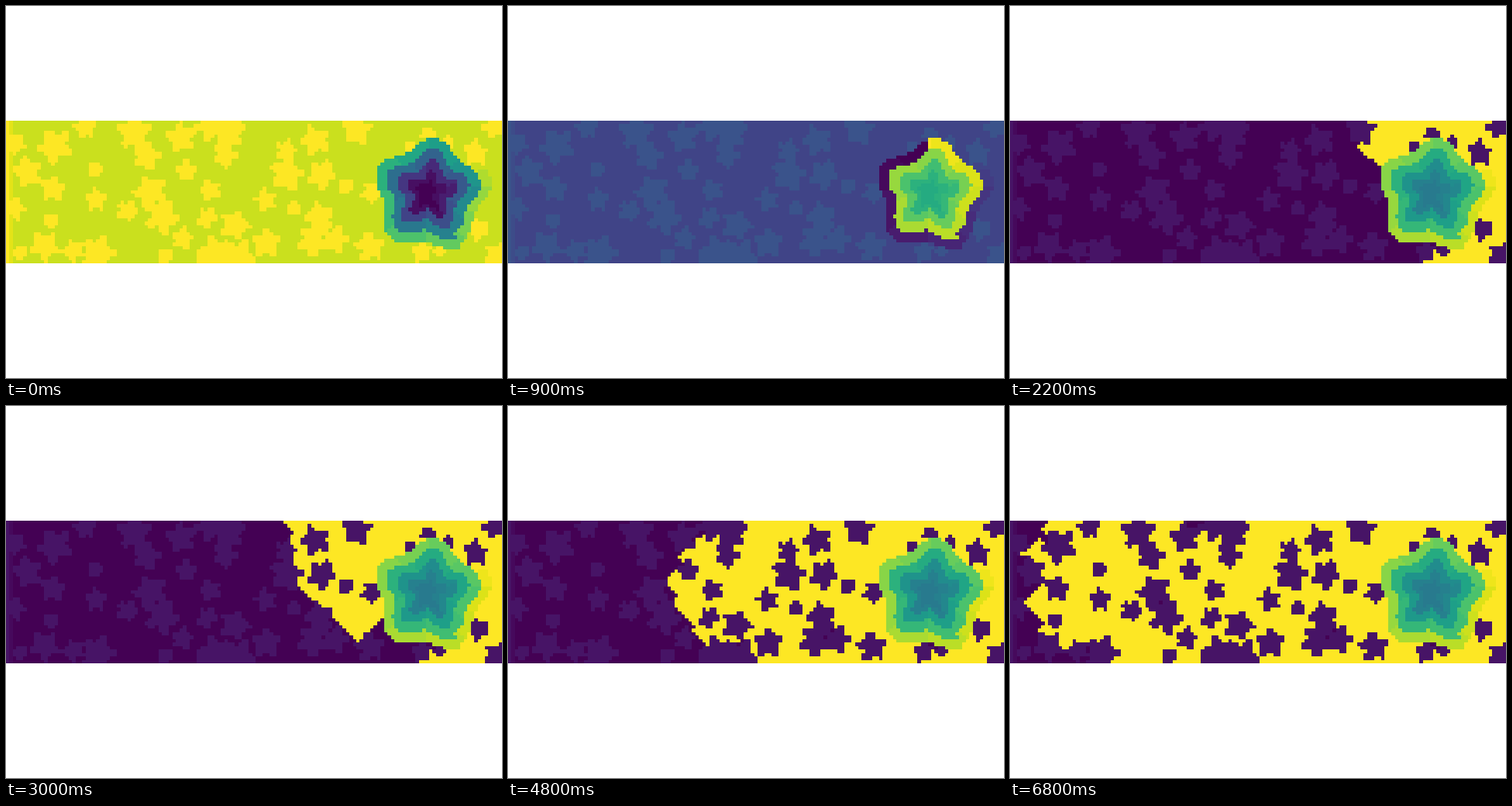
A matplotlib script for the animation above (6900 ms loop, 640 px wide and 480 px high).

```python
from collections import deque

import matplotlib.pyplot as plt
import numpy as np
from matplotlib.animation import FuncAnimation

COLS, ROWS = 143, 41
CELL = 640 / COLS
TOP = 240 - ROWS * CELL / 2
FRAMES = 69
PLAIN, HILL, LIFT = 23, 25, 39

X, Y = np.meshgrid((np.arange(COLS) + 0.5) * CELL,
                   TOP + (np.arange(ROWS) + 0.5) * CELL)

# Rough little hills, grouped by radius in pixels
HILLS = {
    8: [(522, 182), (571, 176), (560, 314)],
    9.5: [(116, 211), (58, 277), (18, 318), (206, 323), (372, 262),
          (438, 233), (544, 165), (255, 330)],
    12.5: [(102, 157), (12, 178), (10, 262), (116, 250), (88, 315),
           (157, 264), (233, 213), (264, 237), (260, 273), (228, 300),
           (335, 250), (473, 241), (362, 187), (537, 316), (610, 288)],
    14: [(282, 192), (606, 190), (630, 156), (632, 322), (60, 236)],
    16.5: [(28, 214), (50, 310), (181, 194), (226, 170), (262, 155),
           (296, 282), (336, 305), (399, 174), (407, 218), (453, 160),
           (405, 273), (396, 304), (425, 301), (470, 310)],
    19: [(63, 181), (120, 318), (165, 163), (186, 240), (202, 272),
         (288, 160), (270, 318), (298, 322), (362, 217)],
}


def polar(cx, cy):
    return np.hypot(X - cx, Y - cy), np.arctan2(cy - Y, X - cx)


def add_hills(land):
    turn = 0.4
    for size, spots in HILLS.items():
        wave = 0.24 if size > 12 else 0.06
        for cx, cy in spots:
            r, a = polar(cx, cy)
            land[r < size * (1 + wave * np.cos(5 * a - turn))] = HILL
            turn += 1.9


def spiral_star():
    """Levels of the star, which climb along an outward spiral."""
    r, a = polar(547, 240)
    phi = (a + np.pi / 3) / (2 * np.pi) % 1
    notch = (1 - np.cos(5 * (a - np.radians(12)))) / 2
    level = np.full(X.shape, np.inf)
    # edge at the tips, notch depth, first level, rise per turn, end of turn
    bands = [(76, 0.18, 19.3, 12, 0.23),
             (62, 0.19, 11, 8.3, 1),
             (48, 0.25, 6, 5, 1),
             (34, 0.34, 1.5, 4.5, 1),
             (20, 0.45, 0.6, 0.9, 1),
             (6, 0.3, 0, 0.4, 1)]
    for edge, depth, start, rise, end in bands:
        inside = (r < (edge + 20 * phi) * (1 - depth * notch)) & (phi <= end)
        level[inside] = (start + rise * phi)[inside]
    return level


def flood(land, star):
    """Cells in the order they are reached: up the star, then over the plain."""
    cells = np.argwhere(np.isfinite(star))
    order = sorted(map(tuple, cells), key=lambda c: star[c])
    seen = set(order)
    queue = deque([(20, 140)])
    seen.add(queue[0])
    while queue:
        row, col = queue.popleft()
        order.append((row, col))
        for step in ((row, col - 1), (row, col + 1),
                     (row - 1, col), (row + 1, col)):
            if (0 <= step[0] < ROWS and 0 <= step[1] < COLS
                    and step not in seen and land[step] <= PLAIN):
                seen.add(step)
                queue.append(step)
    return order


land = np.full((ROWS, COLS), float(PLAIN))
land[:, 1] = 24
add_hills(land)
land[:, 0] = HILL
star = spiral_star()
on_star = np.isfinite(star)
land[on_star] = np.round(star[on_star])

order = flood(land, star)
rank = np.full(land.shape, len(land.flat))
for i, cell in enumerate(order):
    rank[cell] = min(rank[cell], i)
# Constant number of cells per step, so the last step gets to column 3
rate = (rank[:, 3].min() + 1) / (FRAMES - 1)

fig = plt.figure(figsize=(6.4, 4.8), dpi=100, facecolor="white")
ax = fig.add_axes([0, 0, 1, 1])
image = ax.imshow(land, cmap="viridis", interpolation="nearest",
                  aspect="auto", extent=(0, 640, 480 - TOP, TOP))
ax.set(xlim=(0, 640), ylim=(480, 0))
ax.axis("off")


def draw(n):
    view = land + LIFT * (rank < round(n * rate))
    image.set_data(view)
    image.set_clim(view.min(), view.max())
    return [image]


anim = FuncAnimation(fig, draw, frames=FRAMES, interval=100,
                     repeat=True, repeat_delay=0)
plt.show()
```
